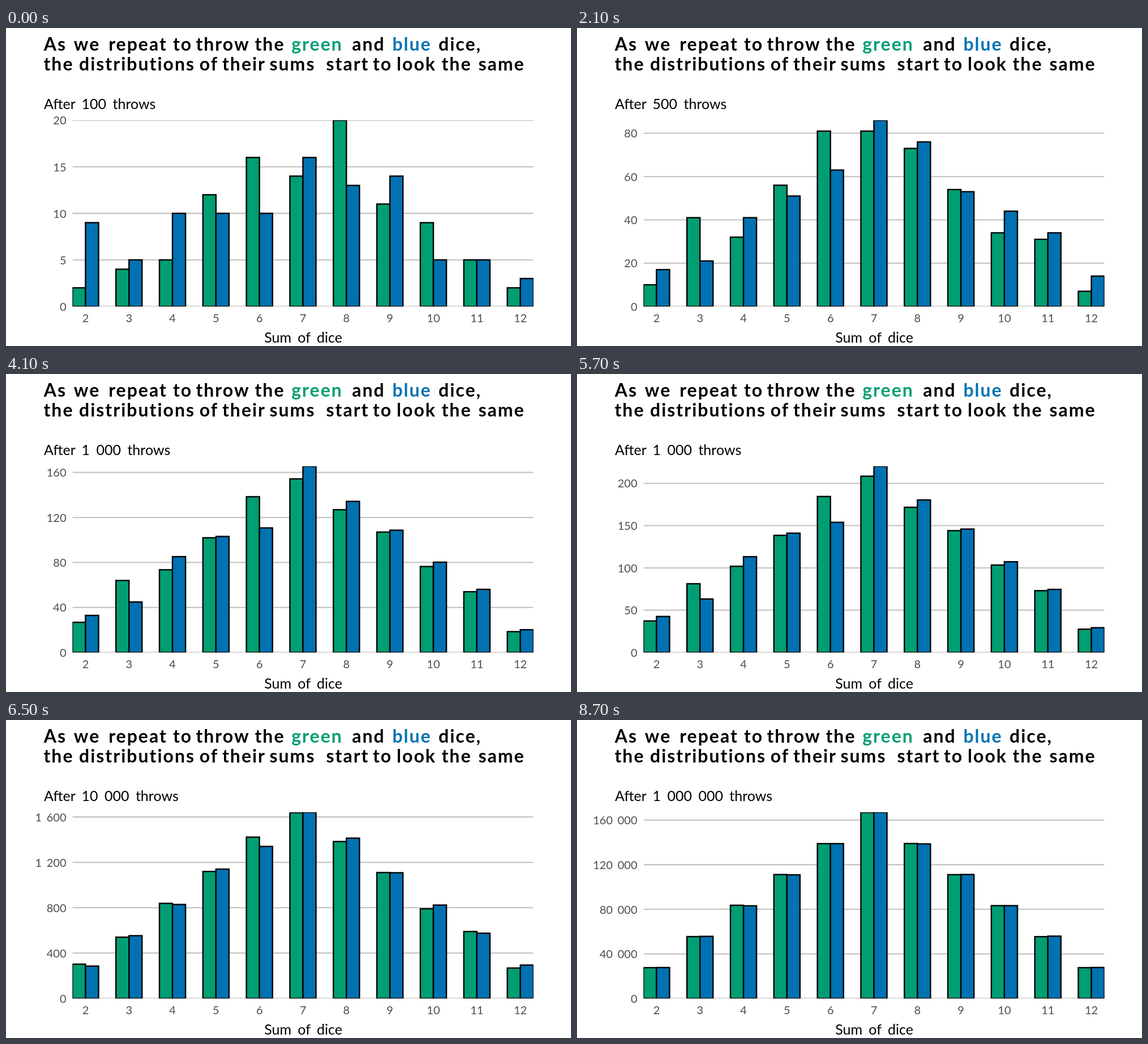
Animation, 998 px wide and 561 px high, one loop 10 s. Source, as an HTML page:

```html
<!DOCTYPE html>
<html lang="en">
<head>
<meta charset="utf-8">
<title>Sums of dice</title>
<style>
  html, body { margin: 0; width: 100%; height: 100%; overflow: hidden; background: #fff; }
  svg { display: block; width: 998px; height: 561px; font-family: Lato, "Open Sans", sans-serif; }
  .title { font-size: 32px; font-weight: 700; letter-spacing: 2px; text-anchor: middle; }
  .label { font-size: 25px; word-spacing: 5px; }
  .tick { font-size: 20px; fill: #4d4d4d; word-spacing: 3.5px; }
  .grid { stroke: #c6c6c6; stroke-width: 2.3; }
  .bars { stroke: #000; stroke-width: 2.4; }
</style>
</head>
<body>
<svg viewBox="0 0 998 561">
  <defs><clipPath id="panel"><rect x="117.4" y="162.8" width="814.2" height="328.4"/></clipPath></defs>
  <g id="title" class="title"></g>
  <text id="count" class="label" x="67" y="143"></text>
  <g clip-path="url(#panel)">
    <g id="grid" class="grid"></g>
    <g id="bars" class="bars"></g>
  </g>
  <g id="yAxis" class="tick" text-anchor="end"></g>
  <g id="xAxis" class="tick" text-anchor="middle"></g>
  <text class="label" x="525" y="554.5" text-anchor="middle">Sum of dice</text>
</svg>
<script>
const GREEN = '#009E73', BLUE = '#0072B2';
const LEFT = 117.4, RIGHT = 931.6, TOP = 162.8, BASE = 491.2;
const UNIT = (RIGHT - LEFT) / 10.6, BAR = UNIT * 0.3;
const LOOP = 10000, STEP = 100, HOLD = 1300, CYCLE = 2200, STEPS = 9;

// Counts for sums 2 to 12
const states = [
  { n: 100,
    green: [2, 4, 5, 12, 16, 14, 20, 11, 9, 5, 2],
    blue: [9, 5, 10, 10, 10, 16, 13, 14, 5, 5, 3] },
  { n: 500,
    green: [10, 41, 32, 56, 81, 81, 73, 54, 34, 31, 7],
    blue: [17, 21, 41, 51, 63, 86, 76, 53, 44, 34, 14] },
  { n: 1000,
    green: [29, 67, 79, 108, 146, 164, 134, 114, 82, 57, 20],
    blue: [35, 48, 91, 110, 117, 176, 142, 116, 85, 59, 21] },
  { n: 10000,
    green: [302, 540, 838, 1119, 1422, 1638, 1383, 1110, 790, 590, 268],
    blue: [285, 553, 828, 1140, 1340, 1641, 1413, 1108, 823, 575, 294] },
  { n: 1000000,
    green: [27600, 55500, 83600, 111150, 138900, 166900, 139000, 111050, 83250, 55450, 27600],
    blue: [27700, 55700, 83100, 110900, 138900, 167030, 138650, 111200, 83250, 55900, 27750] }
];

const words = [
  { y: 40, list: [['As', 87], ['we', 143], ['repeat', 233], ['to', 312], ['throw', 383], ['the', 466],
    ['green', 549.5, GREEN], ['and', 640.5], ['blue', 717, BLUE], ['dice,', 802]] },
  { y: 75, list: [['the', 93], ['distributions', 231.5], ['of', 358.5], ['their', 420.5], ['sums', 506],
    ['start', 603.5], ['to', 665], ['look', 725], ['the', 796], ['same', 875.5]] }
];

const el = id => document.getElementById(id);
const text = (x, y, s, fill) => `<text x="${x}" y="${y}"${fill ? ` fill="${fill}"` : ''}>${s}</text>`;
const format = n => String(n).replace(/\B(?=(\d{3})+$)/g, ' ');
const centre = i => LEFT + BAR + i * UNIT;

// Tick spacing from zero: trades round steps, coverage and density (about five ticks)
function tickStep(max) {
  const bases = [1, 5, 2, 2.5, 4, 3];
  const power = Math.floor(Math.log10(max));
  let best = -Infinity, pick = 1;
  for (let p = power - 1; p <= power; p++) {
    bases.forEach((base, i) => {
      const step = base * 10 ** p;
      for (let n = 1; n <= 10; n++) {
        const end = n * step;
        const simple = 1 - i / 5;
        const cover = 1 - 0.5 * ((max - end) / (0.1 * max)) ** 2;
        const ratio = n / end * Math.max(end, max) / 4;
        const dense = 2 - Math.max(ratio, 1 / ratio);
        const score = 0.25 * simple + 0.2 * cover + 0.5 * dense;
        if (score > best) { best = score; pick = step; }
      }
    });
  }
  return pick;
}

function bar(x, value, max, fill) {
  const h = value / max * (BASE - TOP);
  return `<rect x="${x}" y="${BASE - h}" width="${BAR}" height="${h}" fill="${fill}"/>`;
}

function draw(time) {
  const since = time - HOLD;
  const i = Math.max(0, Math.min(3, Math.floor(since / CYCLE)));
  const k = Math.max(0, Math.min(STEPS, Math.floor((since - i * CYCLE) / STEP) + 1));
  const ease = (1 - Math.cos(Math.PI * k / STEPS)) / 2;
  const from = states[i], to = states[i + 1];
  const blend = key => from[key].map((v, j) => v + (to[key][j] - v) * ease);
  const green = blend('green'), blue = blend('blue');
  const max = Math.max(...green, ...blue);

  el('count').textContent = `After ${format(k > STEPS / 2 ? to.n : from.n)} throws`;

  const step = tickStep(max);
  let grid = '', labels = '';
  for (let v = 0; v <= max * 1.000001; v += step) {
    const y = BASE - v / max * (BASE - TOP);
    grid += `<path d="M${LEFT} ${y}H${RIGHT}"/>`;
    labels += text(106.5, y + 7.6, format(Math.round(v)));
  }
  el('grid').innerHTML = grid;
  el('yAxis').innerHTML = labels;
  el('bars').innerHTML = green.map((v, j) =>
    bar(centre(j) - BAR, v, max, GREEN) + bar(centre(j), blue[j], max, BLUE)).join('');
}

el('title').innerHTML = words.map(line =>
  line.list.map(([word, x, fill]) => text(x, line.y, word, fill)).join('')).join('');
el('xAxis').innerHTML = states[0].green.map((_, i) => text(centre(i), 519, i + 2)).join('');

const start = performance.now();
let last = -1;
function tick() {
  const slot = Math.floor((performance.now() - start) % LOOP / STEP);
  if (slot !== last) draw((last = slot) * STEP);
  requestAnimationFrame(tick);
}
tick();
</script>
</body>
</html>
```
